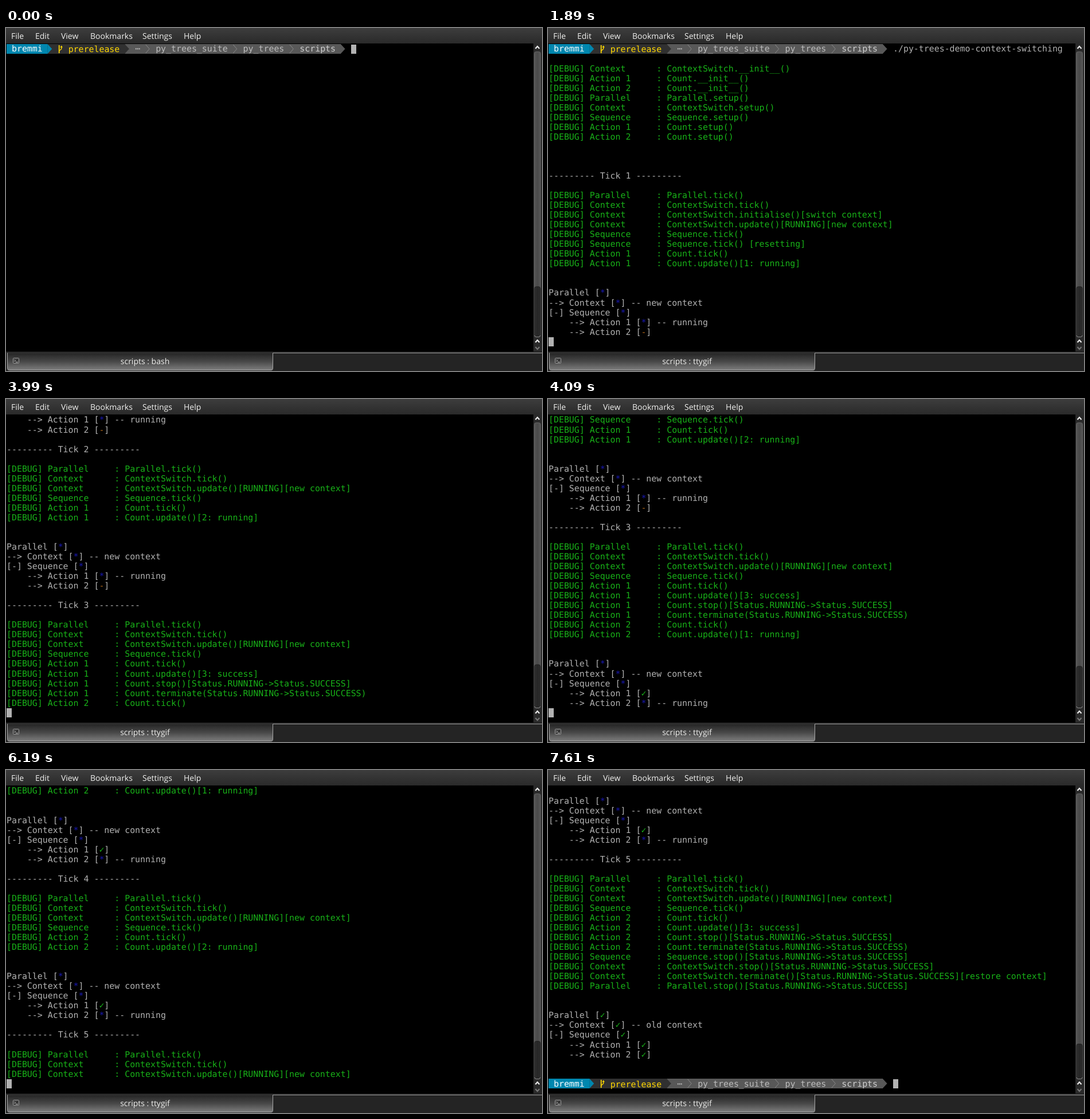
Write an HTML page with a canvas that moves like this. It is 935 px wide and 599 px high and loops after 8 s.

```html
<!DOCTYPE html>
<html lang="en">
<head>
<meta charset="utf-8">
<title>Terminal session</title>
<style>
html, body { margin: 0; width: 100%; height: 100%; overflow: hidden; background: #000; }
canvas { display: block; }
</style>
</head>
<body>
<canvas id="stage" width="935" height="599"></canvas>
<script>
const ctx = document.getElementById('stage').getContext('2d');
const LOOP = 8000, ROWS = 31, CELL = 8.97, PITCH = 17.04, BASELINE = 41.97;
const MONO = '14.9px "DejaVu Sans Mono", monospace';
const SANS = '14px "Open Sans", "Noto Sans", sans-serif';
const GREY = '#b2b2b2', GREEN = '#18b218';
const MARKS = { '*': '#1818b2', '-': '#b26818', '✓': GREEN };
const COMMAND = './py-trees-demo-context-switching';

// [time, value] steps
const TYPED = [[0, 0], [690, 1], [790, 2], [890, 3], [990, 16], [1090, 17], [1190, 33]];
const PRINTED = [[0, 0], [1660, 1], [1790, 12], [1890, 30], [2890, 44], [2990, 46], [3990, 58],
  [4090, 66], [5090, 78], [5190, 82], [6190, 88], [6290, 99], [6390, 104], [7390, 106]];
const at = (steps, t) => steps.findLast(s => s[0] <= t)[1];

// --- log contents ---
const CLASSES = { P: ['Parallel', 'Parallel'], C: ['Context', 'ContextSwitch'], S: ['Sequence', 'Sequence'],
  1: ['Action 1', 'Count'], 2: ['Action 2', 'Count'] };
const CHANGE = 'Status.RUNNING->Status.SUCCESS';
const debug = (key, call) => {
  const [name, cls] = CLASSES[key];
  return '[DEBUG] ' + name.padEnd(13) + ': ' + cls + '.' + call;
};
const ticked = key => debug(key, 'tick()');
const stopped = key => debug(key, `stop()[${CHANGE}]`);
const updated = (key, n) => debug(key, `update()[${n}: ${n < 3 ? 'running' : 'success'}]`);
const finished = key => [updated(key, 3), stopped(key), debug(key, `terminate(${CHANGE})`)];
const contextUpdate = debug('C', 'update()[RUNNING][new context]');
const start = [ticked('P'), ticked('C'), contextUpdate, ticked('S')];

function tick(n, events, root, first, second) {
  const action = (i, m) => `    --> Action ${i} [${m}]` + (m === '*' ? ' -- running' : '');
  return ['', `--------- Tick ${n} ---------`, '', ...events, '', '',
    `Parallel [${root}]`,
    `--> Context [${root}] -- ${root === '*' ? 'new' : 'old'} context`,
    `[-] Sequence [${root}]`, action(1, first), action(2, second)];
}

const lines = ['', '',
  ...['C', '1', '2'].map(k => debug(k, '__init__()')),
  ...['P', 'C', 'S', '1', '2'].map(k => debug(k, 'setup()')), '', '',
  ...tick(1, [ticked('P'), ticked('C'), debug('C', 'initialise()[switch context]'), contextUpdate,
    ticked('S'), debug('S', 'tick() [resetting]'), ticked(1), updated(1, 1)], '*', '*', '-'),
  ...tick(2, [...start, ticked(1), updated(1, 2)], '*', '*', '-'),
  ...tick(3, [...start, ticked(1), ...finished(1), ticked(2), updated(2, 1)], '*', '✓', '*'),
  ...tick(4, [...start, ticked(2), updated(2, 2)], '*', '✓', '*'),
  ...tick(5, [...start, ticked(2), ...finished(2), stopped('S'), stopped('C'),
    debug('C', `terminate()[${CHANGE}][restore context]`), stopped('P')], '✓', '✓', '✓'),
  '', ''];

// --- drawing helpers ---
const colX = col => 1 + col * CELL;
const rowY = row => Math.round(28 + row * PITCH);

function rect(x, y, w, h, fill) {
  ctx.fillStyle = fill;
  ctx.fillRect(x, y, w, h);
}
function box(x, y, w, h, r, fill, stroke) {
  ctx.beginPath();
  ctx.roundRect(x, y, w, h, r);
  ctx.fillStyle = fill;
  ctx.fill();
  if (stroke) { ctx.strokeStyle = stroke; ctx.lineWidth = 1; ctx.stroke(); }
}
function path(points, color, width) {
  ctx.beginPath();
  points.forEach(([x, y]) => ctx.lineTo(x, y));
  if (width) { ctx.strokeStyle = color; ctx.lineWidth = width; ctx.stroke(); }
  else { ctx.fillStyle = color; ctx.fill(); }
}
function shade(x0, y0, x1, y1, ...colors) {
  const g = ctx.createLinearGradient(x0, y0, x1, y1);
  colors.forEach((c, i) => g.addColorStop(i / (colors.length - 1), c));
  return g;
}
function label(text, x, y, align = 'left') {
  ctx.font = SANS;
  ctx.textAlign = align;
  ctx.fillStyle = '#f0f0ee';
  ctx.fillText(text, x, y);
}
function mono(text, col, row, color, dy = 0) {
  ctx.font = MONO;
  ctx.textAlign = 'left';
  ctx.fillStyle = color;
  ctx.fillText(text, colX(col), Math.floor(BASELINE + row * PITCH) + dy);
}

// --- terminal ---
function logLine(line, row) {
  if (line.startsWith('[DEBUG]')) return mono(line, 0, row, GREEN);
  const mark = line.match(/ \[(.)\]/);
  if (!mark) return mono(line, 0, row, GREY);
  const i = mark.index + 2;
  mono(line.slice(0, i) + ' ' + line.slice(i + 1), 0, row, GREY);
  mono(mark[1], i, row, MARKS[mark[1]]);
}

function prompt(row) {
  const y = rowY(row), h = 17, mid = y + h / 2;
  const band = (from, to, color) => rect(colX(from), y, (to - from) * CELL, h, color);
  const tip = (col, color) => path([[colX(col) - .3, y], [colX(col) + 7.5, mid], [colX(col) - .3, y + h]], color);
  band(0, 8, '#0087af');
  band(8, 23, '#303030');
  band(23, 65, '#585858');
  tip(8, '#0087af');
  tip(23, '#303030');
  tip(65, '#585858');
  for (const col of [27, 44, 55]) {
    const x = colX(col);
    path([[x + .5, y + 1], [x + 7, mid], [x + .5, y + h - 1]], '#8a8a8a', 1);
  }
  const x = colX(10);
  path([[x + 2, y + 2], [x + 2, y + 16]], '#ffd700', 1.8);
  path([[x + 2, y + 12], [x + 6, y + 8.5], [x + 6, y + 4]], '#ffd700', 1.4);
  path([[x + 3.8, y + 6], [x + 6, y + 2.5], [x + 8.2, y + 6]], '#ffd700');
  mono('bremmi', 1, row, '#ffffff');
  mono('prerelease', 12, row, '#ffd700', 1);
  mono('⋯', 25, row, '#bcbcbc');
  mono('py_trees_suite', 29, row, '#bcbcbc');
  mono('py_trees', 46, row, '#bcbcbc');
  mono('scripts', 57, row, '#d0d0d0');
}

function cursor(col, row) {
  rect(Math.round(colX(col)), rowY(row) + 1, 9, 16, GREY);
}

function terminal(t, count, scroll) {
  lines.slice(scroll, count).forEach((line, row) => logLine(line, row));
  if (!scroll) {
    const typed = at(TYPED, t);
    prompt(0);
    mono(COMMAND.slice(0, typed), 67, 0, GREY);
    if (!count) return cursor(67 + typed, 0);
  }
  const row = count - scroll, done = t >= 7610;
  if (done) prompt(row);
  cursor(done ? 67 : 0, row);
}

// --- window chrome ---
function menuBar() {
  rect(0, 0, 935, 27, shade(0, 0, 0, 27, '#3d3d3d', '#2a2a2a'));
  [['File', 9], ['Edit', 51], ['View', 96], ['Bookmarks', 147], ['Settings', 238], ['Help', 310]]
    .forEach(([text, x]) => label(text, x, 19));
}

function scrollBar(scroll) {
  const chevron = (y, dir, color) => path([[923.5, y + 2 * dir], [927, y - 2 * dir], [930.5, y + 2 * dir]], color, 2);
  const size = 498 * ROWS / (ROWS + 144 + scroll) - 1;
  rect(920, 27, 15, 538, '#2a2a2a');
  box(921.5, 41.5, 11, 498, 3, shade(921, 0, 933, 0, '#585858', '#4a4a4a', '#585858'), '#616161');
  box(922, 539 - size, 10, size, 3, shade(921, 0, 933, 0, '#353535', '#262626', '#303030'), '#1f1f1f');
  path([[922, 537], [924, 539.5], [930, 539.5], [932, 537]], '#8a8a8a', 1);
  chevron(34, 1, '#f0f0f0');
  chevron(547, 1, '#f0f0f0');
  chevron(559, -1, '#777777');
}

function tabBar(title) {
  rect(0, 565, 935, 34, '#242424');
  rect(466, 567, 469, 1, '#a0a0a0');
  box(2.5, 567.5, 463, 30, [0, 0, 3, 3], shade(0, 568, 0, 597, '#262626', '#484848', '#7c7c7c'), '#a8a8a8');
  rect(3, 567, 462, 1, '#383838');
  box(12.5, 576.5, 10, 9, 1, '#3a3a3a', '#a0a0a0');
  path([[14.5, 579], [16.5, 581], [14.5, 583]], '#c0c0c0', 1);
  rect(17, 583, 4, 1, '#c0c0c0');
  label(title, 242.5, 587, 'center');
}

function draw() {
  const t = performance.now() % LOOP;
  const count = at(PRINTED, t);
  const scroll = Math.max(0, count - ROWS + 1);
  ctx.textRendering = 'geometricPrecision';
  rect(0, 0, 935, 599, '#000');
  terminal(t, count, scroll);
  menuBar();
  scrollBar(scroll);
  tabBar('scripts : ' + (t < 690 ? 'bash' : 'ttygif'));
  requestAnimationFrame(draw);
}
draw();
</script>
</body>
</html>
```
